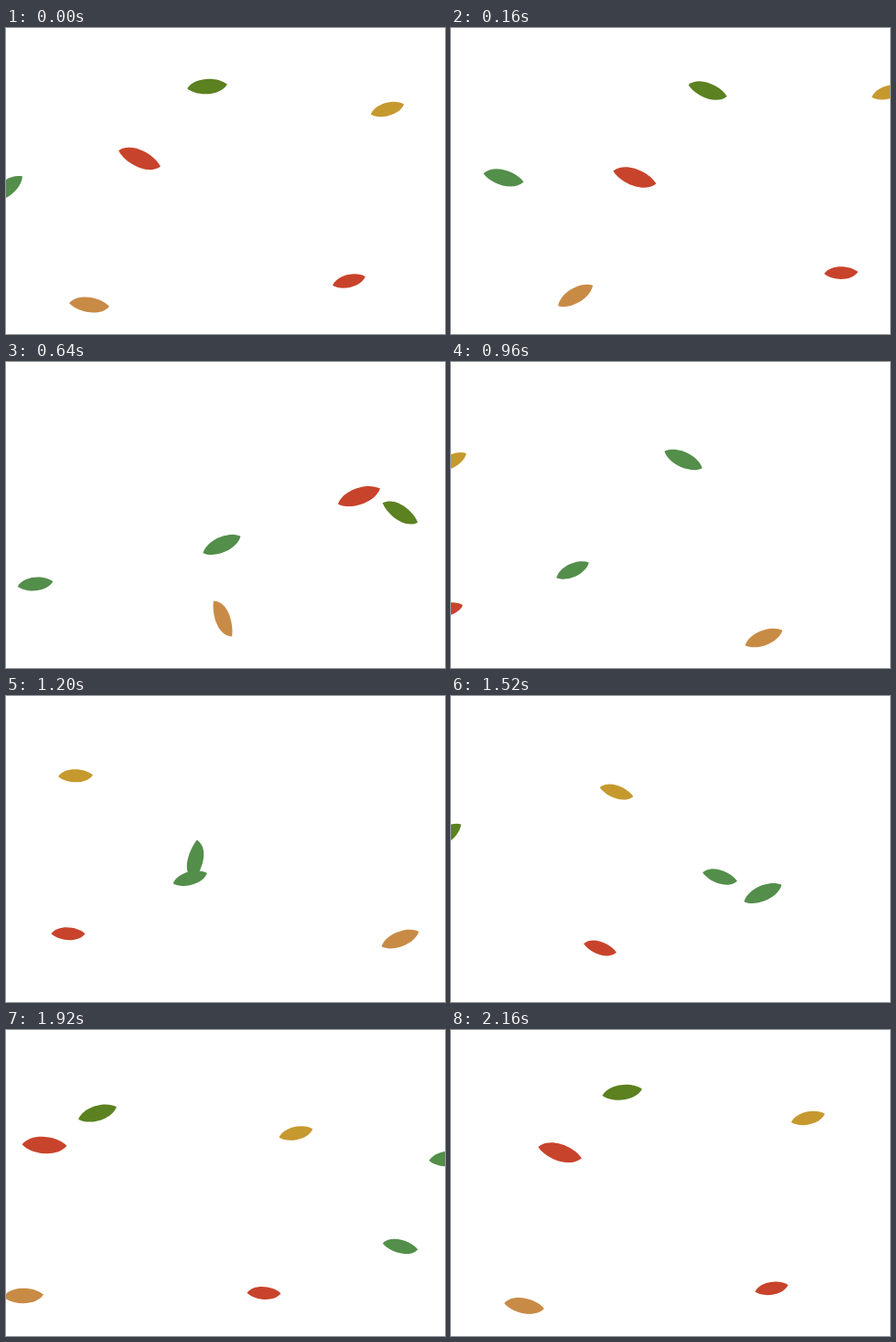
An HTML page with a canvas for the animation above (2.24 s loop, 480 by 335 pixels).

```html
<!DOCTYPE html>
<html lang="en">
<head>
<meta charset="utf-8">
<title>Falling leaves</title>
<style>
html, body { margin: 0; width: 100%; height: 100%; overflow: hidden; background: #fff; }
canvas { display: block; }
</style>
</head>
<body>
<canvas id="stage" width="480" height="335"></canvas>
<script>
const ctx = document.getElementById('stage').getContext('2d');
const LOOP = 2240, STEP = 80;
const DRIFT = 0.4;   // px per ms before the first and after the last key point
const SWING = 1.2;   // how far a curve swings out between key points
const GREEN = '#538e4a', OLIVE = '#5b8120', RED = '#c8432b', GOLD = '#c6992f', ORANGE = '#c88b46';

const leaves = [];
const leaf = (color, size, ...path) => leaves.push({
  color, size,
  path: path.map(([t, x, y, deg]) => {
    const a = deg * Math.PI / 180;
    return { t, x, y, dx: Math.cos(a), dy: Math.sin(a) };
  })
});

// Key points: time, x, y, heading. Times past LOOP run on into the next round.
leaf(OLIVE, 44, [1520, -7, 153, -35], [1920, 100, 91, -18], [2240, 220, 64, -6], [2560, 336, 96, 32], [2880, 431, 165, 29]);
leaf(RED, 49, [1920, 42, 126, 2], [2240, 146, 143, 21], [2560, 258, 171, -1], [2880, 386, 147, -20]);
leaf(GOLD, 38, [960, 0, 109, -28], [1520, 181, 105, 15], [1920, 317, 113, -14], [2240, 417, 89, -17]);
leaf(RED, 37, [960, -5, 271, -15], [1520, 163, 276, 15], [1920, 282, 288, 1], [2240, 375, 277, -15], [2560, 479, 270, 5]);
leaf(ORANGE, 44, [1920, 19, 291, -3], [2160, 80, 302, 8], [2240, 91, 303, 5], [2560, 175, 263, -39], [2880, 237, 281, 63], [3200, 342, 302, -22]);
leaf(GREEN, 45, [2240, 0, 176, -37], [2560, 119, 188, 24], [2880, 236, 200, -24], [3200, 254, 107, -156], [3440, 207, 180, 95], [3760, 341, 216, -24], [4160, 485, 141, -5]);
leaf(GREEN, 39, [640, 32, 243, -8], [960, 133, 228, -25], [1520, 294, 198, 14], [1920, 431, 237, 10]);

const glide = (p, ms) => [p.x + p.dx * DRIFT * ms, p.y + p.dy * DRIFT * ms];

function position(path, t) {
  const first = path[0], last = path[path.length - 1];
  if (t <= first.t) return glide(first, t - first.t);
  if (t >= last.t) return glide(last, t - last.t);
  const i = path.findIndex(p => p.t > t), a = path[i - 1], b = path[i];
  const k = (t - a.t) / (b.t - a.t), j = 1 - k;
  const m = SWING * Math.hypot(b.x - a.x, b.y - a.y);
  const mix = (p, q, dp, dq) =>
    p * j * j * (1 + 2 * k) + q * k * k * (1 + 2 * j) + m * (dp * k * j * j - dq * k * k * j);
  return [mix(a.x, b.x, a.dx, b.dx), mix(a.y, b.y, a.dy, b.dy)];
}

// A leaf points along its path and twists a little as it climbs or dives.
function drawLeaf({ color, size, path }, t) {
  const [x, y] = position(path, t);
  const [x0, y0] = position(path, t - 1), [x1, y1] = position(path, t + 1);
  const angle = Math.atan2(y1 - y0, x1 - x0);
  const h = size / 2, c = size * 0.29, w = size * 0.25;
  const twist = 1.5 + 3 * Math.sin(angle);
  ctx.save();
  ctx.translate(x, y);
  ctx.rotate(angle);
  ctx.beginPath();
  ctx.moveTo(-h, 0);
  ctx.bezierCurveTo(-c, -w - twist, c, -w + twist, h, 0);
  ctx.bezierCurveTo(c, w + twist, -c, w - twist, -h, 0);
  ctx.fillStyle = color;
  ctx.fill();
  ctx.restore();
}

function frame() {
  const t = Math.floor(performance.now() % LOOP / STEP) * STEP;
  ctx.fillStyle = '#fff';
  ctx.fillRect(0, 0, 480, 335);
  for (const item of leaves) {
    drawLeaf(item, t);
    drawLeaf(item, t + LOOP);
  }
  requestAnimationFrame(frame);
}
frame();
</script>
</body>
</html>
```
